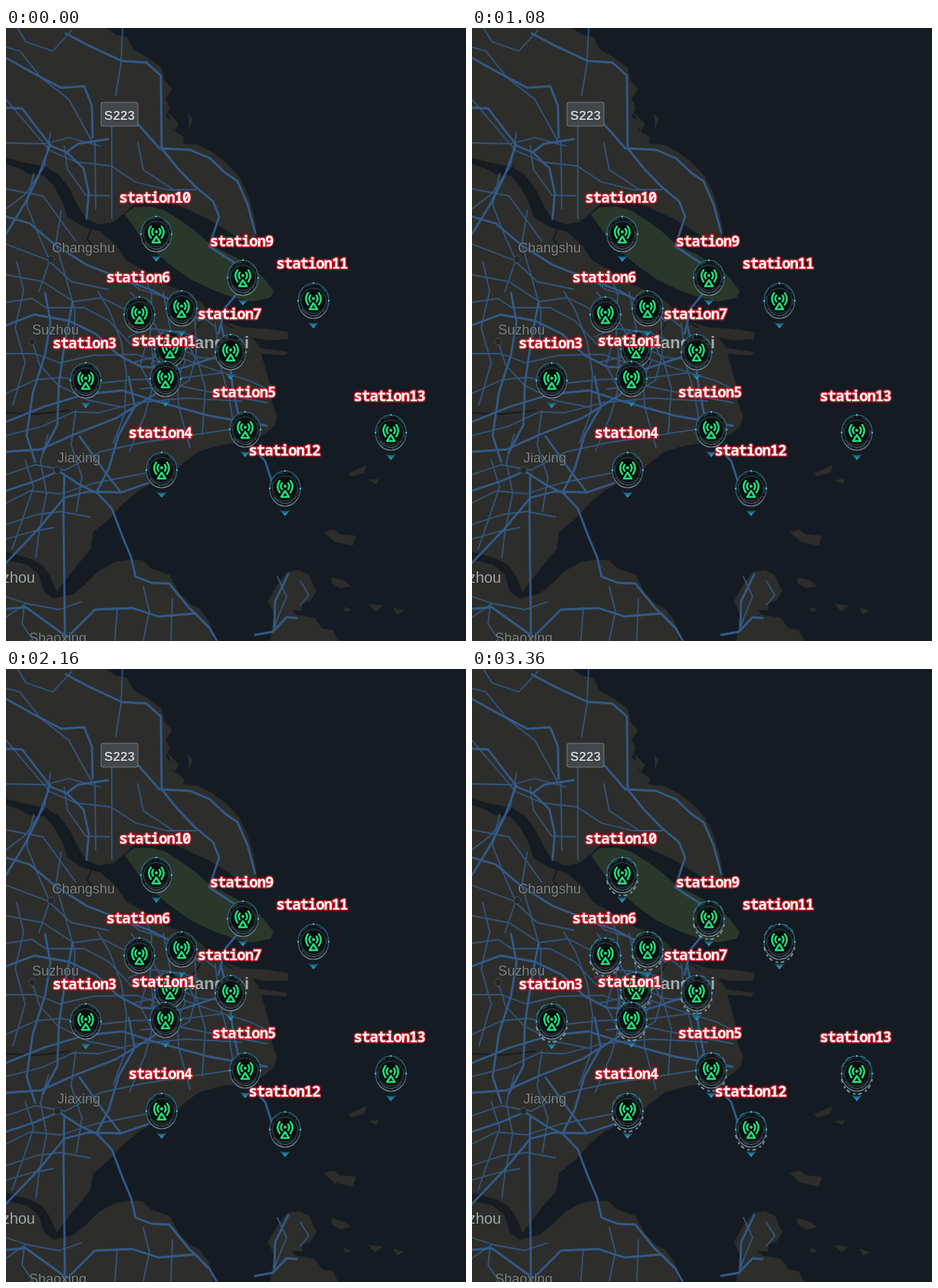
An HTML page that plays this animation: 600 by 800 pixels, repeating every 3.48 s.

```html
<!DOCTYPE html>
<html lang="en">
<head>
<meta charset="utf-8">
<title>Station map</title>
<style>
html, body { margin: 0; width: 100%; height: 100%; overflow: hidden; background: #151b23; }
svg { display: block; width: 600px; height: 800px; }
.land { fill: #2d2e2b; stroke: #2a2c2a; stroke-linejoin: round; }
.water { fill: none; stroke: #171c21; stroke-linejoin: round; stroke-linecap: round; }
.roads { fill: none; stroke: #335d8f; stroke-linejoin: round; stroke-linecap: round; }
.minor { stroke-width: 1.8; opacity: .82; }
.main { stroke-width: 2.8; opacity: .95; }
.city { font: 18px "Liberation Sans", Arial, sans-serif; fill: #7f8383; stroke: #202324; stroke-width: 1; paint-order: stroke; }
.big { font-size: 20px; fill: #a6aaaa; }
.label { font: bold 19px "Noto Sans Mono", monospace; letter-spacing: -1.08px; text-anchor: middle; fill: #fff; stroke: #c91f2b; stroke-width: 3; stroke-linejoin: round; paint-order: stroke; }
.spin { animation: spin 3.48s steps(29) infinite; }
.flare { animation: flare 3.48s step-end infinite; }
@keyframes spin { to { transform: rotate(360deg); } }
@keyframes flare {
  0% { opacity: 0; }
  89.6% { opacity: .2; }
  93.1% { opacity: .45; }
  96.5% { opacity: .8; }
}
</style>
</head>
<body>
<svg viewBox="0 0 600 800">
  <defs>
    <linearGradient id="tip" x2="0" y2="1">
      <stop stop-color="#174b61"/><stop offset="1" stop-color="#2fa9d6"/>
    </linearGradient>
    <linearGradient id="rim" x2="0" y2="1">
      <stop stop-color="#2c7185"/><stop offset=".6" stop-color="#376477"/><stop offset="1" stop-color="#7f8f96"/>
    </linearGradient>
    <radialGradient id="disc">
      <stop offset=".55" stop-color="#05090b"/><stop offset="1" stop-color="#10171b"/>
    </radialGradient>
  </defs>
  <rect width="600" height="800" fill="#151b23"/>

  <g class="land">
    <path d="M0 0H130L143 9 158 12 166 28 185 39 203 52 206 68 216 80 208 92 213 104 208 116 219 123 217 133 232 143 230 151 251 153 270 163 288 177 303 193 314 215 322 240 327 269 325 283 308 278 290 265 266 250 240 238 219 228 195 222 169 227 157 239 140 253 121 256 105 249 94 232 84 211 69 191 51 181 31 183 15 173 0 169Z"/>
    <path d="M0 178 18 184 30 191 50 193 62 206 73 226 80 247 101 260 123 266 143 283 157 304 180 317 210 336 237 346 255 359 270 376 292 391 315 397 329 414 337 440 344 466 347 491 353 505 350 519 337 530 311 540 280 544 252 552 233 566 214 584 193 592 172 604 151 622 135 640 113 658 110 680 95 698 80 717 66 735 57 714 47 700 30 692 0 683Z"/>
    <path d="M0 694 28 701 42 713 49 735 62 745 88 739 105 725 121 709 143 697 164 694 178 695 190 706 213 714 226 738 240 752 252 758 264 774 270 800H0Z"/>
    <path d="M286 384 308 391 340 393 368 397 367 406 340 407 315 402Z M312 414 337 419 367 423 364 427 326 424Z"/>
    <path d="M345 800 350 764 342 748 354 727 367 710 382 708 395 714 401 729 405 734 397 747 386 751 386 760 372 759 378 766 402 770 413 784 426 786 433 800Z"/>
    <path d="M415 658 428 655 435 661 456 663 452 675 428 670Z M447 581 459 576 470 571 467 580 450 585Z M474 590 486 589 483 595Z M425 717 442 722 449 728 436 731 425 724Z M473 752 491 754 482 761Z M506 757 518 761 510 765Z M441 756 450 759 443 762Z M238 112 243 119 239 130Z M212 111 225 125 220 134Z"/>
  </g>
  <path d="M155 243 167 234 189 233 207 238 229 252 247 265 266 282 293 296 319 310 336 326 349 343 345 352 321 357 298 352 270 342 241 328 214 309 190 288 174 270Z" fill="#2a382c"/>

  <g class="water">
    <path d="M0 173 20 178 52 184 71 204 85 229 92 248" stroke-width="6"/>
    <path d="M0 688 30 696 49 710 63 740" stroke-width="8"/>
    <path d="M0 502 39 504 82 499M113 257 106 276 119 292M262 365 251 389 227 421 232 446" stroke-width="2"/>
  </g>

  <g class="roads minor">
    <path d="M0 25 18 30 46 65 82 93 111 146M15 0 26 18 61 30 86 3M0 93 28 126 57 160 92 175 137 180M0 150 51 151 82 143 123 154M58 136 50 181 25 217 0 236M76 154 80 184 104 218 135 219"/>
    <path d="M152 0 150 46 143 88M138 121 138 248M116 147 117 236M137 180 169 201 210 211 248 211M172 150 179 185 220 212M0 210 48 219 91 278M36 190 27 231 44 274 57 303 43 344M0 282 55 303 85 331 133 341"/>
    <path d="M0 322 48 331 88 357 125 352 165 372M72 239 65 282 78 326 90 369 88 411M0 358 34 353 52 365 102 365 134 382 163 413M14 305 23 343 12 391 25 437 9 492M0 425 38 425 70 437 114 427 171 426 210 440"/>
    <path d="M0 477 39 459 72 456 118 464 166 459 235 456 282 450M34 409 44 440 68 466 108 486 153 495M0 532 47 520 88 501 121 502 171 489 235 483 307 487M120 344 135 369 150 409 157 449 155 502 140 542"/>
    <path d="M145 318 174 341 205 350 243 366 273 390M163 345 191 382 208 410 252 430 297 434M178 316 190 348 188 402 195 455 181 505 161 552M205 345 214 391 223 438 225 493 240 548M236 348 247 385 248 427 260 470 256 530M273 385 278 434 291 482 299 531"/>
    <path d="M160 403 186 392 230 397 260 409 305 408M167 436 213 425 265 444 317 460 338 470M176 471 221 466 266 475 341 489M182 415 175 440 189 467 211 477 239 460 247 432 234 405 207 394 182 415M196 418 190 439 202 459 225 455 234 434 222 414 196 418"/>
    <path d="M0 583 38 570 77 577 123 553 178 541 232 533 311 521M0 620 32 604 71 608 115 594 181 581M0 648 40 635 71 631 109 638M0 667 35 657 62 652M25 564 36 599 22 640 8 680M55 530 45 566 53 607 43 658 39 691M91 499 85 544 99 586 92 631"/>
    <path d="M0 769 26 751 69 759 98 749M24 752 21 778 36 800M145 757 142 800M179 729 187 761 179 800M217 745 215 800M0 742 33 753M354 716 366 742 356 766 348 788M384 722 395 740 384 753"/>
  </g>
  <g class="roads main">
    <path d="M0 39 34 58 72 78 102 76 112 101 113 143M78 7 108 23 151 43 183 45 202 62 203 156M171 124 200 157 240 159 266 170 286 189 302 200 315 230 325 267M203 157 224 183 247 207 270 226 278 246 265 285 299 307 306 341 286 365 277 399"/>
    <path d="M0 104 21 105 44 135 59 154 79 162 94 151 133 145M57 154 42 194 25 228 0 269M79 162 101 183 108 215 105 249M0 246 31 255 64 283 105 309 148 326 190 342 220 358 253 382"/>
    <path d="M0 388 37 374 82 382 117 399 147 427 176 442 226 445 281 427M51 346 58 383 51 426 35 476 27 532 38 566M87 357 77 409 69 464 67 518 48 554M0 514 50 494 103 478 152 473 199 488 265 506 340 519"/>
    <path d="M0 553 45 550 90 530 144 509 194 478 211 454M96 533 129 579 150 606M160 455 168 494 147 531 134 575 119 604M281 389 291 431 296 471 305 514 315 541 338 565 353 611 359 622"/>
    <path d="M76 585 75 638 77 800M67 577 96 596 119 607 138 627 152 664 163 690 169 716 190 724 213 725 238 756 265 782 275 800M0 698 42 654 76 613 107 605 150 606 185 594"/>
    <path d="M0 604 39 591 67 579M0 758 26 756 51 774 80 795 116 759 165 757 199 768 247 764 263 781M325 792 348 788 366 769 379 770M368 713 351 748 350 781"/>
  </g>

  <g class="city">
    <g fill="#25282a" stroke="#55595a" stroke-width="1.4">
      <circle cx="59" cy="302" r="4"/><circle cx="34" cy="409" r="4"/><circle cx="67" cy="577" r="4"/>
    </g>
    <text x="60" y="293">Changshu</text>
    <text x="34" y="400">Suzhou</text>
    <text x="67" y="567">Jiaxing</text>
    <text x="30" y="802">Shaoxing</text>
    <text class="big" x="38" y="724" text-anchor="end">Hangzhou</text>
    <text class="big" x="317" y="418" text-anchor="end" style="font-size:22px;font-weight:bold">Shanghai</text>
    <rect x="124.5" y="97.5" width="47" height="30" rx="2" fill="#42474b" stroke="#74797c" stroke-width="2"/>
    <text x="148" y="119.5" text-anchor="middle" style="font-size:17.2px;font-weight:bold;fill:#cdd0d1">S223</text>
  </g>
  <g id="pins"></g>
  <g id="labels" class="label"></g>
</svg>
<script>
const pins = [
  [196, 269], [309, 326], [401, 356], [174, 374], [229, 366], [214, 419], [293, 423],
  [104, 460], [208, 458], [312, 524], [502, 528], [203, 577], [364, 601]
];
const labels = [
  [10, 194, 228], [9, 307, 285], [11, 399, 314], [6, 172, 332], [7, 291, 380], [3, 102, 418],
  [1, 205, 415], [5, 310, 482], [13, 500, 487], [4, 201, 535], [12, 363, 558]
];

const pin = ([x, y]) => `<g transform="translate(${x} ${y})" fill="none">
  <path d="M-7 28Q0 31 7 28L0 36Z" fill="url(#tip)"/>
  <ellipse rx="20" ry="23" fill="#0b1115" fill-opacity=".8" stroke="url(#rim)" stroke-width="1.2"/>
  <g transform="scale(.9 1.03)">
    <circle class="spin" r="20.2" stroke="#4b9aa9" stroke-width="1" stroke-dasharray="9 4 2 6" opacity=".45"/>
  </g>
  <circle r="16.5" fill="url(#disc)" stroke="#394349"/>
  <path d="M-15 10Q0 29 15 10" stroke="#969fa2" stroke-width="1" opacity=".6"/>
  <g fill="#4bb3d0"><circle cy="-23" r="1.2"/><circle cx="-20" r="1.2"/><circle cx="20" r="1.2"/></g>
  <g class="flare">
    <path d="M-20 7Q-16 26 0 27Q16 26 20 7" stroke="#8fa9b6" stroke-width="2" stroke-dasharray="5 5 3 3"/>
    <path d="M-20-8Q-15-21-5-23M5-23Q15-21 20-8" stroke="#2d7e94" stroke-width="1.2" stroke-dasharray="7 4"/>
  </g>
  <g stroke="#20df79" stroke-width="2.5" stroke-linecap="round" stroke-linejoin="round">
    <circle cy="-3" r="2" fill="#20df79" stroke="none"/>
    <path d="M-4-7Q-7-3-4 1M4-7Q7-3 4 1M-7-10Q-12.5-3-7 5M7-10Q12.5-3 7 5M0 3-5 11H5Z"/>
  </g>
</g>`;
const label = ([n, x, y]) => `<text x="${x}" y="${y}">station${n}</text>`;

document.getElementById('pins').innerHTML = pins.map(pin).join('');
document.getElementById('labels').innerHTML = labels.map(label).join('');
</script>
</body>
</html>
```
